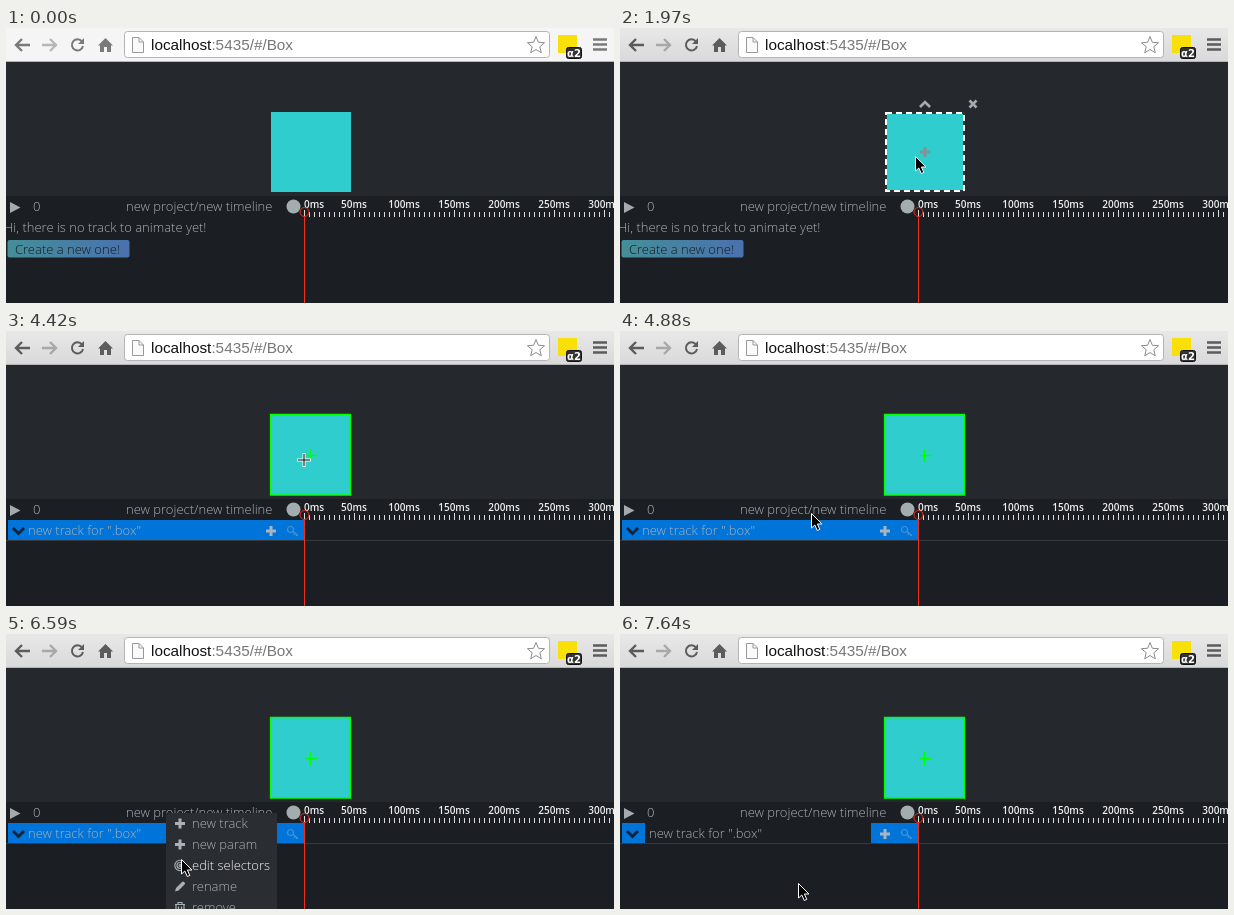
These frames come from a looping animation (608 px wide and 275 px high, 8 s). An HTML page:

```html
<!DOCTYPE html>
<html lang="en">
<head>
<meta charset="utf-8">
<title>Timeline editor</title>
<style>
  html, body { margin: 0; width: 100%; height: 100%; overflow: hidden; background: #1b1e22; }
  svg { display: block; width: 100vw; height: 100vh; }
  text { font: 300 13px "Open Sans", sans-serif; fill: #a9b1b4; white-space: pre; }
  .url { font: 15.3px "Liberation Sans", Arial, sans-serif; fill: #777; }
  .ruler text { font-size: 10px; font-weight: 600; fill: #eee; }
  .badge { font: bold 10px "DejaVu Sans", sans-serif; fill: #fff; }
  .line { fill: none; stroke-width: 2; }
  .hover { fill: #f4f4f4; }
</style>
</head>
<body>
<svg viewBox="0 0 608 275">
  <defs>
    <linearGradient id="bar" x2="0" y2="1">
      <stop stop-color="#e9e8e9"/><stop offset="1" stop-color="#dad9da"/>
    </linearGradient>
    <linearGradient id="button"><stop stop-color="#458e98"/><stop offset="1" stop-color="#4a71ae"/></linearGradient>
    <path id="plus" d="M-5-1.5H-1.5V-5H1.5V-1.5H5V1.5H1.5V5H-1.5V1.5H-5Z"/>
    <g id="key" class="line" style="stroke-width:1.2">
      <circle cx="-2.5" cy="-1.5" r="3"/><path d="M0 .5L5 4.5M2 2L.5 4M4 3.5L3 5"/>
    </g>
    <g id="target" class="line" stroke="#a9b1b4" style="stroke-width:1.1">
      <circle r="5.2"/><circle r="3"/><circle r="1"/>
    </g>
    <path id="pencil" fill="#a9b1b4" d="M-5 5L-4 1.5 2-4.5Q3-5.5 4-4.5L4.700-3.8Q5.500-3 4.500-2L-1.500 4Z"/>
    <path id="trash" class="line" stroke="#a9b1b4" style="stroke-width:1.2" d="M-5-3H5M-2-3V-5H2V-3M-4-3V5H4V-3M-1.500-1V3M1.500-1V3"/>
  </defs>

  <rect y="34" width="608" height="134" fill="#25292d"/>
  <rect y="168" width="608" height="107" fill="#1b1e22"/>

  <rect id="toolbar" width="608" height="34"/>
  <path d="M0 33.500H608" stroke="#b5b5b5"/>
  <g id="icons" class="line" stroke="#5c5c5c">
    <path d="M24 17H10M16 11L10 17L16 23" stroke-width="2.400"/>
    <path d="M36 17H50M44 11L50 17L44 23" stroke="#a8a8a8" stroke-width="2.400"/>
    <path d="M76 13.500A5.600 5.600 0 1 0 77 18"/>
    <path d="M78 10V16H72Z" fill="#5c5c5c" stroke="none"/>
    <path d="M92 17.500L99.500 10 107 17.500H105V24H101V19H98V24H94V17.500Z" fill="#5c5c5c" stroke="none"/>
    <path d="M587 11.500H601M587 16.500H601M587 21.500H601" stroke-width="2.600"/>
  </g>
  <rect x="118.500" y="3.500" width="425" height="26" rx="3" fill="#fff" stroke="#b4b4b4"/>
  <path d="M126.500 9.500H133L137.500 14V24.500H126.500ZM133 9.500V14H137.500" fill="#fafafa" stroke="#999"/>
  <text class="url" x="145" y="22"><tspan fill="#111">localhost</tspan>:5435/#/Box</text>
  <path id="star" fill="#fff" stroke="#8c8c8c" stroke-linejoin="round"/>
  <rect x="552" y="7" width="19" height="18" fill="#f8e008"/>
  <rect x="560.500" y="19.500" width="15" height="11" rx="2" fill="#333" stroke="#111"/>
  <text class="badge" x="568" y="28.500" text-anchor="middle">α2</text>

  <rect x="265" y="84" width="80" height="80" fill="#2fcdcd"/>
  <g id="selection">
    <rect class="line" x="266" y="85" width="78" height="78" stroke="#333"/>
    <rect class="line" x="266" y="85" width="78" height="78" stroke="#fff" stroke-dasharray="6 4"/>
    <use href="#plus" x="305" y="124" fill="#829496"/>
    <path class="line" d="M300 79L305 74L310 79M349.500 72.500L356.500 79.500M356.500 72.500L349.500 79.500" stroke="#a4abad" style="stroke-width:2.600"/>
  </g>
  <path id="corner" d="M0 34.500H4" stroke="#0d0"/>
  <path id="outline" d="M264.500 83.500H344.500V164H264.500ZM299 124.500H311M304.500 118V131" fill="none" stroke="#0f0" stroke-width="1.300"/>

  <path d="M4 174L14.500 179.500 4 185Z" fill="#a4abad"/>
  <text x="27" y="183">0</text>
  <text x="120" y="183">new project/new timeline</text>
  <circle cx="287.500" cy="178.500" r="7" fill="#a3acae"/>

  <g id="empty">
    <text x="-2" y="204">Hi, there is no track to animate yet!</text>
    <rect x="1.500" y="212" width="122" height="17.500" rx="2" fill="url(#button)"/>
    <text x="9" y="226" style="fill:#16191d">Create a new one!</text>
  </g>
  <g id="track">
    <path d="M0 209.500H608" stroke="#373b40"/>
    <rect x="2" y="189" width="296" height="20" fill="#0074d9"/>
    <rect id="plain" x="25" y="189" width="226" height="20" fill="#1b1e22"/>
    <path class="line" d="M7 197L12.500 202.500 18 197" stroke="#10243c" style="stroke-width:3"/>
    <text id="label" y="204">new track for ".box"</text>
    <use href="#plus" x="265" y="200" fill="#a9b4bc"/>
    <use href="#key" x="287" y="200" stroke="#4a92cf"/>
  </g>

  <g class="ruler"><path id="ticks" stroke="#ddd"/><g id="times"></g></g>
  <path d="M298.500 188V275" stroke="#f0301c"/>
  <circle cx="298.500" cy="184" r="4.500" fill="none" stroke="#f0301c"/>

  <g id="menu"><rect x="160" y="179" width="111" height="96" fill="#2a2e32"/></g>

  <g id="arrow"><path d="M.5.5V15L3.800 12 6.300 17.500 8.800 16.400 6.400 11H11Z" stroke="#fff" stroke-linejoin="round"/></g>
  <g id="cross">
    <path d="M-7 0H7M0-7V7" stroke="#fff" stroke-width="3"/>
    <path d="M-6 0H6M0-6V6" stroke="#000"/>
  </g>
</svg>
<script>
const $ = id => document.getElementById(id);
const LOOP = 8000;

function add(parent, tag, attrs, text = "") {
  const node = document.createElementNS("http://www.w3.org/2000/svg", tag);
  for (const name in attrs) node.setAttribute(name, attrs[name]);
  node.textContent = text;
  parent.append(node);
  return node;
}

const starPoints = Array.from({ length: 10 }, (_, i) => {
  const angle = (i / 5 - 0.5) * Math.PI, radius = i % 2 ? 4 : 9;
  return [530 + radius * Math.cos(angle), 17.5 + radius * Math.sin(angle)];
});
$("star").setAttribute("d", "M" + starPoints.join("L") + "Z");

let ticks = "";
for (let ms = 0; ms <= 310; ms += 5) {
  const x = 298 + ms;
  ticks += `M${x + 0.5} ${ms % 50 ? 184 : 182}V189`;
  if (ms % 50 === 0) {
    add($("times"), "text", { x, y: 180, "text-anchor": ms ? "middle" : "start" }, ms + "ms");
  }
}
$("ticks").setAttribute("d", ticks);

const items = [
  ["new track", "plus"], ["new param", "plus"], ["edit selectors", "target"],
  ["rename", "pencil"], ["remove", "trash"]
].map(([name, icon], i) => {
  const y = 194 + 21 * i;
  add($("menu"), "use", { href: "#" + icon, x: 174, y: y - 4.5, fill: "#a9b1b4" });
  return add($("menu"), "text", { x: 186, y }, name);
});

// Pointer moves: start, end, steps, from, to
const moves = [
  [500, 780, 6, [287, 212], [295, 128]],
  [2510, 2750, 5, [295, 128], [305, 122]],
  [3400, 3400, 1, [305, 122], [306.5, 124.5]],
  [4420, 5060, 11, [306.5, 124.5], [157, 199]],
  [5830, 6110, 6, [157, 199], [175, 226]],
  [6590, 6590, 1, [175, 226], [175, 225]],
  [6890, 7280, 8, [175, 225], [178, 249]]
];

function pointerAt(t) {
  const move = moves.filter(m => m[0] <= t).pop();
  if (!move) return null;
  const [start, end, steps, from, to] = move;
  const step = t >= end ? steps : 1 + Math.floor((t - start) / (end - start) * (steps - 1) + 1e-6);
  const p = step / steps;
  const eased = (p + p * p * (3 - 2 * p)) / 2;
  return from.map((v, i) => Math.round((v + (to[i] - v) * eased) * 2) / 2);
}

const show = (id, on) => $(id).setAttribute("display", on ? "inline" : "none");

function render(t) {
  const focused = t >= 1130, tracked = t >= 3280, closed = t >= 7640;
  const menuOpen = t >= 5240 && !closed;
  $("toolbar").setAttribute("fill", focused ? "url(#bar)" : "#f5f5f5");
  $("icons").setAttribute("opacity", focused ? 1 : 0.8);
  show("selection", t >= 1970 && !tracked);
  show("corner", tracked && t < 3340);
  show("outline", t >= 3340);
  show("empty", !tracked);
  show("track", tracked);
  show("plain", closed);
  $("label").setAttribute("x", closed ? 29 : 22);
  show("menu", menuOpen);

  const pointer = pointerAt(t);
  const [x, y] = pointer || [0, 0];
  const overBox = t >= 3400 && x > 264 && y < 164;
  show("arrow", pointer && !overBox);
  show("cross", overBox);
  for (const id of ["arrow", "cross"]) $(id).setAttribute("transform", `translate(${x} ${y})`);

  const hovered = menuOpen && x >= 160 ? Math.floor((y - 179) / 21) : -1;
  items.forEach((item, i) => item.classList.toggle("hover", i === hovered));
}

const begin = performance.now();
function frame() {
  render((performance.now() - begin) % LOOP);
  requestAnimationFrame(frame);
}
frame();
</script>
</body>
</html>
```
